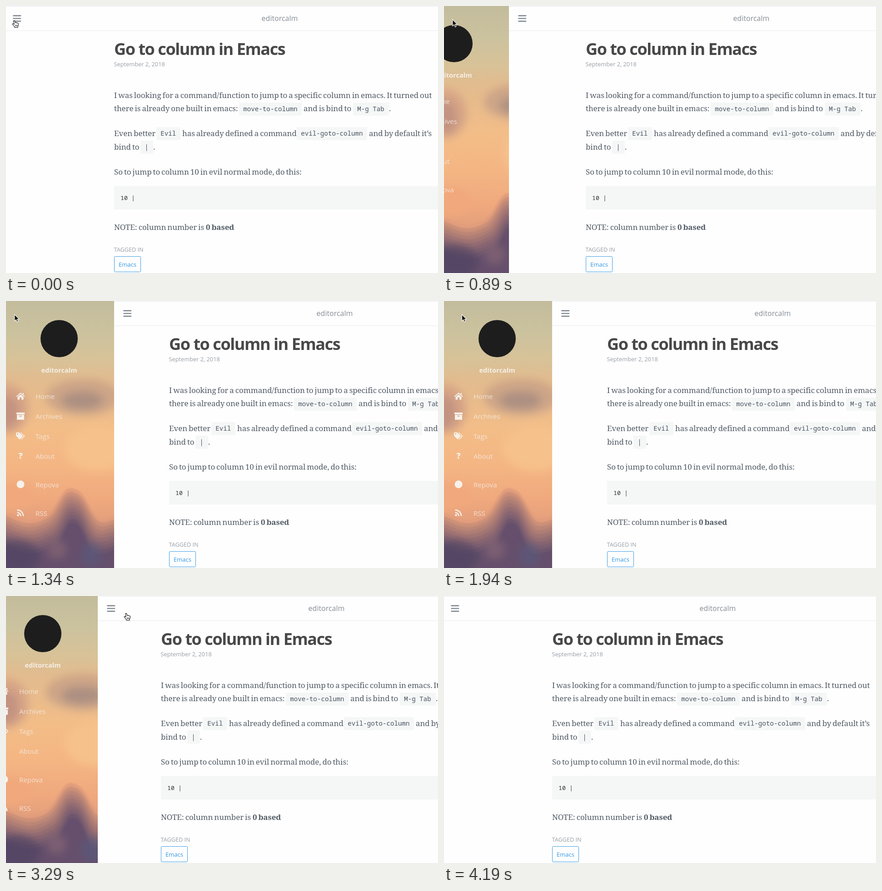
An HTML page that plays this animation: 951x589 px, repeating every 5090 ms.

```html
<!DOCTYPE html>
<html lang="en">
<head>
<meta charset="utf-8">
<title>Sliding sidebar</title>
<style>
  html, body { margin: 0; width: 100%; height: 100%; overflow: hidden; background: #fefefe; }
  svg { display: block; width: 951px; height: 589px; }
  text { white-space: pre; }
  .sans { font-family: "Open Sans", sans-serif; }
  .body { font: 17px "Noto Serif", serif; letter-spacing: -.1px; word-spacing: -1.3px; fill: #505a64; }
  .code { font: 14.2px "Noto Sans Mono", monospace; fill: #48535f; }
  .menu { font-size: 15px; fill: #f5eee6; opacity: .8; }
  .icon { fill: #f7f1ea; }
  .box { fill: #f5f7f7; }
</style>
</head>
<body>
<svg viewBox="0 0 951 589">
  <defs>
    <linearGradient id="sky" x2="0" y2="1">
      <stop offset="0" stop-color="#c3bc9c"/>
      <stop offset=".12" stop-color="#cbc29e"/>
      <stop offset=".22" stop-color="#d8c298"/>
      <stop offset=".3" stop-color="#e2bb8e"/>
      <stop offset=".48" stop-color="#f3bd88"/>
      <stop offset=".62" stop-color="#f4b583"/>
      <stop offset=".75" stop-color="#efa87d"/>
      <stop offset="1" stop-color="#c98c7c"/>
    </linearGradient>
    <filter id="soft" x="-50%" y="-50%" width="200%" height="200%"><feGaussianBlur stdDeviation="9"/></filter>
    <filter id="slight"><feGaussianBlur stdDeviation="1.5"/></filter>
  </defs>

  <rect width="240" height="589" fill="url(#sky)"/>
  <g filter="url(#soft)">
    <ellipse cx="170" cy="212" rx="82" ry="40" fill="#cda587"/>
    <ellipse cx="168" cy="219" rx="46" ry="20" fill="#ad9082"/>
    <ellipse cx="0" cy="238" rx="50" ry="55" fill="#d6a486"/>
    <ellipse cx="0" cy="245" rx="28" ry="36" fill="#c39381"/>
    <ellipse cx="200" cy="325" rx="70" ry="50" fill="#f7c18b"/>
    <ellipse cx="10" cy="430" rx="50" ry="30" fill="#f1a87b"/>
  </g>
  <g id="hills" filter="url(#slight)"></g>
  <g filter="url(#soft)" opacity=".65">
    <ellipse cx="25" cy="565" rx="50" ry="38" fill="#4d4262"/>
    <ellipse cx="112" cy="548" rx="22" ry="22" fill="#886775"/>
    <ellipse cx="188" cy="560" rx="22" ry="28" fill="#5a5a7d"/>
  </g>

  <g id="sidebar" class="sans">
    <circle cx="117" cy="83" r="41" fill="#1d1d1d"/>
    <text x="117" y="158" text-anchor="middle" font-size="14.6" font-weight="700" fill="#f5efe6">editorcalm</text>
    <g id="menu"></g>
    <g class="icon">
      <path d="M32 202l9.5 8.3-1.2 1.4-8.3-7.2-8.3 7.2-1.2-1.4zM36.5 203h2.5v4l-2.5-2zM25.500 212l6.500-5.700 6.500 5.700v5.500h-4.500v-5h-4v5h-4.500z"/>
      <path d="M23 246h18v4h-18zM24 251h16v11h-16zM29.500 253v1.800h5v-1.800z" fill-rule="evenodd"/>
      <path d="M22 290h7l8 8-7 7.500-8-8.500zM25.500 292a1.500 1.500 0 1 0 .1 0zM31 290h2l8.500 8.300-7.300 7.500-1.200-1.200 6.200-6.300z" fill-rule="evenodd"/>
      <text x="32" y="348" text-anchor="middle" font-size="18" font-weight="800">?</text>
      <circle cx="32" cy="404.500" r="8.500"/>
      <circle cx="26.500" cy="472.500" r="2.300"/>
      <path d="M24.500 466.500a8 8 0 0 1 8 8M24.500 461a13.500 13.500 0 0 1 13.500 13.500" fill="none" stroke="#f7f1ea" stroke-width="2.600"/>
    </g>
  </g>

  <g id="page">
    <rect width="970" height="589" fill="#fefefe"/>
    <path d="M0 .5H970M0 54.500H970" stroke="#e9ebf3"/>
    <path d="M21.500 21.400h15.500M21.500 27.500h15.500M21.500 33.600h15.500" stroke="#858e97" stroke-width="2.700" stroke-linecap="round"/>
  </g>

  <g id="content">
    <g class="sans">
      <text x="602.500" y="33" text-anchor="middle" font-size="16" fill="#858d95">editorcalm</text>
      <text x="238" y="108" font-size="36" font-weight="700" letter-spacing="-1.44" fill="#484848">Go to column in Emacs</text>
      <text x="237.500" y="133" font-size="12.800" fill="#989fa6">September 2, 2018</text>
      <text x="237.500" y="542" font-size="12.700" fill="#989fa6">TAGGED IN</text>
      <rect x="238.500" y="552.500" width="58" height="34" rx="2" fill="none" stroke="#3b9ce6"/>
      <text x="248" y="574.500" font-size="13" fill="#2f95e3">Emacs</text>
    </g>
    <g id="article"></g>
    <rect class="box" x="238" y="397" width="730" height="52"/>
    <text class="code" x="252" y="428" style="font-size:13.300px;fill:#303234">10 |</text>
  </g>

  <g id="arrow">
    <path d="M.8 .9V15.200L4.100 12.200 6.500 17.300 9 16.200 6.700 11.200H11Z" fill="#111" stroke="#fff" stroke-width="1.100"/>
  </g>
  <g id="hand" stroke="#111" stroke-width="1.100" stroke-linejoin="round">
    <path d="M4 2.500C4 .6 6.600 .6 6.700 2.500L7.500 6C8.300 5 9.800 5.300 10 6.400 11 5.600 12.200 6 12.400 7 13.600 6.600 14.500 7.300 14.500 8.500 14.600 12 13.500 13 13 14.500V16.500H6V15C4.500 13.500 2.500 11 1.200 9.500 .8 8 2.500 7.400 3.600 8.400L5 9.600Z" fill="#fff"/>
    <path d="M7.800 10.500v3.500M9.800 10.500v3.500M11.800 10.500v3.500" stroke-width=".9"/>
  </g>
</svg>
<script>
const $ = id => document.getElementById(id);
const LOOP = 5090;

// Dusk hills: nested wave bands that darken towards the bottom.
const mix = (a, b, k) => a.map((v, i) => Math.round(v + (b[i] - v) * k));
const BANDS = 10;
$('hills').innerHTML = Array.from({ length: BANDS }, (_, i) => {
  const k = i / (BANDS - 1);
  let d = 'M-9 600';
  for (let x = -9; x <= 250; x += 4) {
    const hump = 52 * Math.exp(-(Math.abs((x - 151) / (40 - 14 * k)) ** 2.8));
    const y = 472 + 75 * k + 10 * Math.sin(x / 24 - .6) - hump;
    d += `L${x} ${y.toFixed(1)}`;
  }
  return `<path d="${d}L250 600Z" fill="rgb(${mix([226, 157, 123], [101, 80, 108], k ** .8)})"/>`;
}).join('');

const menu = [['Home', 216], ['Archives', 260], ['Tags', 303.5], ['About', 347.5], ['Repova', 410.5], ['RSS', 473.5]];
$('menu').innerHTML = menu.map(([label, y]) => `<text class="menu" x="65" y="${y}">${label}</text>`).join('');

const prose = (x, y, s, weight = 400) =>
  `<text class="body" x="${x}" y="${y}" style="font-weight:${weight}">${s}</text>`;
const code = (x, y, width, s) =>
  `<rect class="box" x="${x}" y="${y - 19}" width="${width}" height="29" rx="2"/>` +
  `<text class="code" x="${x + 9.3}" y="${y}">${s}</text>`;

$('article').innerHTML = [
  prose(238, 203, 'I was looking for a command/function to jump to a specific column in emacs. It turned out'),
  prose(238, 232, 'there is already one built in emacs:'),
  code(513, 232, 138, 'move-to-column'),
  prose(655, 232, 'and is bind to'),
  code(764, 232, 79, 'M-g Tab'),
  prose(843, 232, '.'),
  prose(238, 287, 'Even better'),
  code(331, 286, 53, 'Evil'),
  prose(388, 287, 'has already defined a command'),
  code(640, 286, 155, 'evil-goto-column'),
  prose(799, 287, 'and by default it’s'),
  prose(238, 317, 'bind to'),
  code(296, 316, 28, '|'),
  prose(324, 317, '.'),
  prose(238, 372, 'So to jump to column 10 in evil normal mode, do this:'),
  prose(238, 494, 'NOTE: column number is'),
  prose(440, 494, '0 based', 700),
].join('');

// [start ms, sidebar travel in px]
const slides = [[0, 0], [750, 12], [890, 148], [1040, 225], [1190, 242.6], [1340, 243],
  [3290, 207], [3440, 67], [3590, 11], [3740, 0]];
// [start ms, pointer shape, x, y]
const pointers = [[0, 'hand', 13, 31], [150, 'arrow', 18, 29], [1940, 'arrow', 38.5, 29],
  [2090, 'arrow', 121.5, 29], [2240, 'arrow', 149.5, 25], [2390, 'arrow', 216.5, 23],
  [2540, 'arrow', 239, 29], [2840, 'hand', 259, 37], [3890, 'arrow', 247.5, 36.5],
  [4040, 'arrow', 308.5, 213.5], [4190, 'none', 0, 0]];

const at = (steps, t) => steps.findLast(step => step[0] <= t);
const move = (id, x, y = 0) => $(id).setAttribute('transform', `translate(${x} ${y})`);

function draw(now) {
  const t = now % LOOP;
  const [, travel] = at(slides, t);
  move('sidebar', travel - 243);
  move('page', travel - 5);
  move('content', Math.floor(travel / 2));

  const [, shape, x, y] = at(pointers, t);
  for (const id of ['arrow', 'hand']) {
    $(id).setAttribute('visibility', id === shape ? 'visible' : 'hidden');
    move(id, x, y);
  }
}

const start = performance.now();
function tick() {
  draw(performance.now() - start);
  requestAnimationFrame(tick);
}
tick();
</script>
</body>
</html>
```
